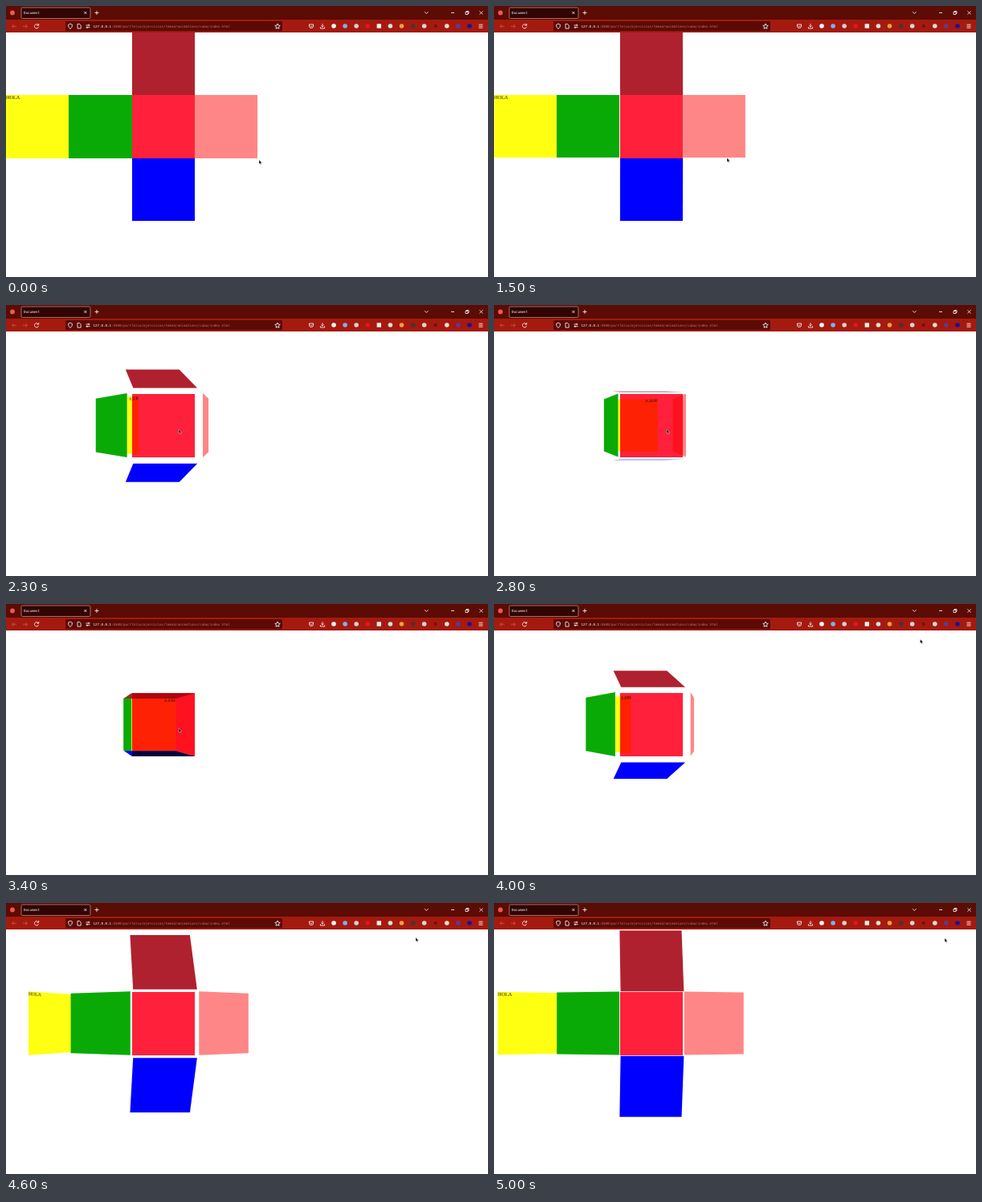
An HTML page that plays this animation: 600 px wide and 338 px high, repeating every 5100 ms.

```html
<!DOCTYPE html>
<html lang="es">
<head>
<meta charset="utf-8">
<title>Document</title>
<style>
html, body { margin: 0; width: 100%; height: 100%; overflow: hidden; background: #fff; }
#scene, svg { position: absolute; left: 0; top: 0; width: 600px; height: 338px; }
#scene { overflow: hidden; background: #fff; isolation: isolate; perspective: 365px; perspective-origin: 100px 150.4px; }
#scene div { position: absolute; width: 78.25px; height: 78.25px; left: 156.5px; top: 111.25px; }
#scene #back { left: 0; background: #ffff11; color: #222; font: 6.25px/7.4px "Liberation Serif", serif; text-rendering: geometricPrecision; }
#scene #right { left: 234.75px; background: #ff8686; transform-origin: left; }
#scene #left { left: 78.25px; background: #0aaa06; transform-origin: right; }
#scene #top { top: 33px; background: #b0212f; transform-origin: bottom; }
#scene #bottom { top: 189.5px; background: #00f; transform-origin: top; }
#scene #front { background: #ff213b; mix-blend-mode: multiply; }
text { font: 4.16px "DejaVu Sans Mono", monospace; text-rendering: geometricPrecision; }
</style>
</head>
<body>
<div id="scene">
  <div id="back">HOLA</div>
  <div id="right"></div>
  <div id="left"></div>
  <div id="top"></div>
  <div id="bottom"></div>
  <div id="front"></div>
</div>
<svg viewBox="0 0 600 338">
  <path fill="#5b0c04" d="M0 0h600v17H0z"/>
  <path fill="#a51a0f" d="M0 17h600v16H0z"/>
  <rect x="19" y="2" width="86" height="13.5" rx="1.5" fill="#300502" stroke="#c08a86" stroke-width=".8"/>
  <rect x="74" y="19" width="270" height="12.3" rx="1.5" fill="#5b0a04"/>
  <text x="22" y="10" fill="#fff">Document</text>
  <text x="108.5" y="26.5" fill="#c9766d"><tspan fill="#fff">127.0.0.1</tspan>:5500/portfolio/ejercicios/tema4/animations/cubo/index.html</text>
  <g fill="none" stroke="#fff" stroke-width=".8">
    <path d="M97.3 7l3 3m0-3l-3 3M110.5 8.5h5m-2.5-2.5v5M521 7.2l2.3 2.3 2.3-2.3M554 8.5h4M572 7.5h3v3h-3zM573 7.5v-1h3v3h-1M589.5 6.5l4 4m0-4l-4 4"/>
    <path stroke="#d0584d" d="M13 25.3H7.5m2.3-2.3l-2.3 2.3 2.3 2.3M21 25.3h5.5m-2.3-2.3l2.3 2.3-2.3 2.3"/>
    <path d="M40.3 24a2.6 2.6 0 1 0 .2 2.2M40.7 22v2.2h-2.2"/>
    <path d="M80 22.2l2.4 1c0 2.7-.6 4.2-2.4 5.2-1.8-1-2.4-2.5-2.4-5.2zM89 22.5h2.6l1.6 1.6v4H89zM99.5 24h5m-1.5-1.3v2.6M99.5 26.7h5m-3.5-1.3V28"/>
    <path d="M338 22l1 2.1 2.2.3-1.6 1.6.4 2.3-2-1.1-2 1.1.4-2.3-1.6-1.6 2.2-.3z"/>
    <path d="M377.5 23h5v2a2.5 2.5 0 0 1-5 0zM378.8 24.6l1.2 1.2 1.2-1.2M394 22.2v4m-1.7-1.7l1.7 1.7 1.7-1.7M391.4 26.3v1.7h5.2v-1.7M588.5 23.2h5m-5 2h5m-5 2h5"/>
  </g>
  <g id="icons"><circle cx="8" cy="8.5" r="2.9" fill="#f0584e"/></g>
  <path id="cursor" d="M0 0v5l1.2-1 .8 1.8.9-.4-.8-1.7h1.6z" fill="#000" stroke="#fff" stroke-width=".35"/>
</svg>
<script>
const LOOP = 5100, STEP = 100, FOLD = 1480, UNFOLD = 3615, SPAN = 2000, SIZE = 78.25;
const $ = id => document.getElementById(id);

// Toolbar buttons, 14px apart
const buttons = ['#fff', '#7fb2e8', '#d8d2cc', '#e8141c', '#f4eeee', '#cfe6d6', '#e8a33c',
  '#4a3330', '#d9d4d4', '#7a0d0d', '#e6dccf', '#5a3a96', '#1c0f9c'];
$('icons').innerHTML += buttons.map((c, i) => {
  const x = 408 + i * 14.08;
  return i == 4 ? `<rect x="${x - 2.7}" y="22.3" width="5.4" height="5.4" fill="${c}"/>`
    : `<circle cx="${x}" cy="25" r="${i == 9 ? 2 : 2.8}" fill="${c}"/>`;
}).join('');

// time, x, y of the pointer
const path = [[1400, 315, 192], [1500, 290, 189.5], [1900, 215, 155], [3500, 215, 155], [3600, 265, 140],
  [3700, 470, 75], [3800, 569, 48], [4000, 530.5, 44], [4400, 505, 43], [4600, 510, 43], [5000, 561, 43.8]];

function pointer(t) {
  if (t <= path[0][0]) return path[0].slice(1);
  const i = path.findIndex(k => k[0] >= t);
  if (i < 0) return path[path.length - 1].slice(1);
  const [a, b] = [path[i - 1], path[i]], k = (t - a[0]) / (b[0] - a[0]);
  return [a[1] + (b[1] - a[1]) * k, a[2] + (b[2] - a[2]) * k];
}

// The CSS "ease" curve
function ease(x) {
  if (x <= 0) return 0;
  if (x >= 1) return 1;
  const curve = (u, a, b) => 3 * u * (1 - u) ** 2 * a + 3 * u * u * (1 - u) * b + u ** 3;
  let lo = 0, hi = 1;
  for (let i = 0; i < 24; i++) {
    const mid = (lo + hi) / 2;
    if (curve(mid, .25, .25) < x) lo = mid; else hi = mid;
  }
  return curve(lo, .1, 1);
}

function draw(t) {
  const p = ease((t - FOLD) / SPAN) - ease((t - UNFOLD) / SPAN);
  // Flaps drift outward and forward while they turn
  const gap = 7 * Math.sin(Math.PI * p ** 1.4);
  const lift = 9 * (1 - (1 - p) ** 8) * (1 - p ** 8);
  const shift = 2 * SIZE * (p - .65 * p * (1 - p) ** 3);
  const place = (id, x, y, z, axis, angle) => {
    $(id).style.transform = `translate3d(${x}px,${y}px,${z}px) rotate${axis}(${angle}deg)`;
  };
  place('left', -gap, 0, lift, 'Y', -90 * p);
  place('right', gap, 0, lift, 'Y', 90 * p);
  place('top', 0, -gap, lift, 'X', 90 * p);
  place('bottom', 0, gap, lift, 'X', -90 * p);
  place('back', shift, 0, -SIZE * p, 'Y', 180 * p);
  $('cursor').setAttribute('transform', `translate(${pointer(t)})`);
}

const start = performance.now();
function frame() {
  const t = (performance.now() - start) % LOOP;
  draw(Math.floor(t / STEP) * STEP);
  requestAnimationFrame(frame);
}
frame();
</script>
</body>
</html>
```
